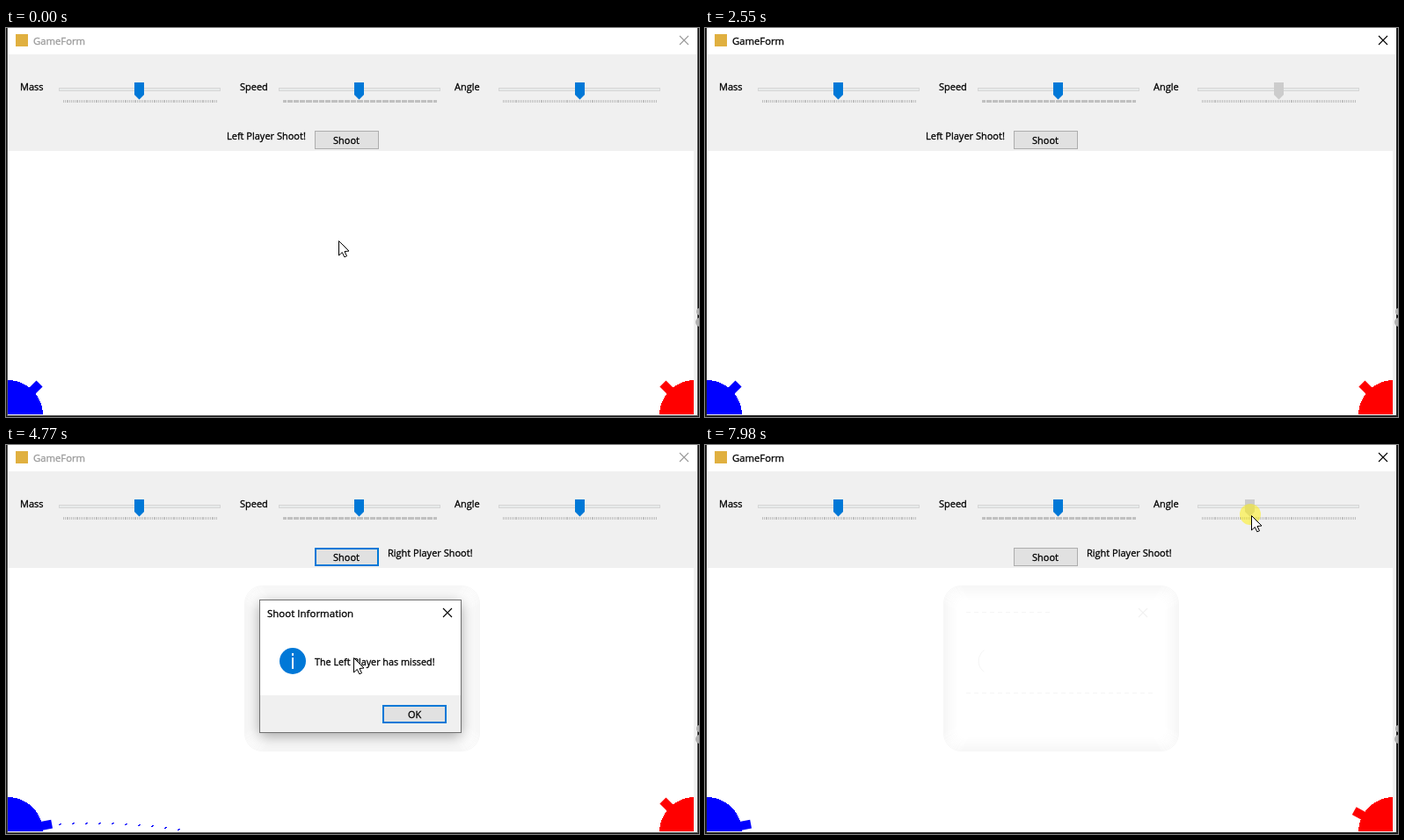
Recreate the animation shown at these times as an HTML page with a canvas. Size 788 by 443 pixels, loop 8000 ms.

```html
<!DOCTYPE html>
<html lang="en">
<head>
<meta charset="utf-8">
<title>GameForm</title>
<style>
html, body { margin: 0; width: 100%; height: 100%; overflow: hidden; background: #fff; }
canvas { display: block; width: 788px; height: 443px; }
</style>
</head>
<body>
<canvas id="stage" width="788" height="443"></canvas>
<script>
const ctx = document.getElementById('stage').getContext('2d');
const LOOP = 8000, BLUE = '#0078d7', CENTER = 652.5;

// Points the pointer travels between
const HOME = [378, 242], LABEL = [232, 140], LEFT_GUN = [78, 372], ANGLE = [654, 76],
  LOW_ANGLE = [585, 80], SHOOT = [386, 132], MESSAGE = [380, 243], OK = [468, 306],
  BELOW_SLIDERS = [417, 108], RIGHT_AIM = [619, 80];

// Each move takes equal time per leg; the pointer vanishes while it rests in between
const MOVES = [
  { from: 40, to: 640, via: [[290, 133], LABEL] },
  { from: 860, to: 1660, via: [[204, 296], LEFT_GUN, [504, 49], [418, 88]] },
  { from: 1680, to: 2050, via: [[661, 76], ANGLE] },
  { from: 2600, to: 3400, via: [LOW_ANGLE] },
  { from: 3400, to: 3780, via: [SHOOT] },
  { from: 4400, to: 4950, via: [[403, 242], MESSAGE] },
  { from: 5150, to: 5700, via: [OK] },
  { from: 5960, to: 6370, via: [[430, 90], BELOW_SLIDERS] },
  { from: 6560, to: 7330, via: [ANGLE] },
  { from: 7580, to: LOOP, via: [RIGHT_AIM] }
];
const DRAG_LEFT = [2250, 3400], FIRE = [4050, 4110], CONFIRM = [5790, 5850], DRAG_RIGHT = [7580, LOOP];

const during = (t, [a, b]) => t >= a && t < b;
const ramp = (t, a, b) => Math.min(1, Math.max(0, (t - a) / (b - a)));
const inBox = (p, x, y, w, h) => p.x >= x && p.x < x + w && p.y >= y && p.y < y + h;

function pointerAt(t) {
  let last = HOME, visible = t < MOVES[0].from;
  for (const { from, to, via } of MOVES) {
    if (t < from) break;
    if (t < to) {
      const stops = [last, ...via], pos = ramp(t, from, to) * via.length, i = Math.floor(pos);
      last = stops[i].map((v, axis) => v + (stops[i + 1][axis] - v) * (pos - i));
      visible = true;
      break;
    }
    last = via[via.length - 1];
  }
  return { x: Math.round(last[0]), y: Math.round(last[1]), visible };
}

function rect(x, y, w, h, fill) {
  ctx.fillStyle = fill;
  ctx.fillRect(x, y, w, h);
}

function frame(x, y, w, h, color, width = 1) {
  ctx.strokeStyle = color;
  ctx.lineWidth = width;
  ctx.strokeRect(x + width / 2, y + width / 2, w - width, h - width);
}

// A hairline outline gives the crisp, dark look of hinted screen text
function text(str, x, y, color = '#000', size = 11) {
  ctx.font = `${size}px "Open Sans", "Noto Sans", sans-serif`;
  ctx.fillStyle = ctx.strokeStyle = color;
  ctx.lineWidth = 0.3;
  ctx.fillText(str, x, y);
  ctx.strokeText(str, x, y);
}

function poly(points, fill, stroke) {
  ctx.beginPath();
  points.forEach(([x, y]) => ctx.lineTo(x, y));
  ctx.closePath();
  ctx.fillStyle = fill;
  ctx.fill();
  if (stroke) {
    ctx.strokeStyle = stroke;
    ctx.lineWidth = 1;
    ctx.stroke();
  }
}

function cross(x, y, color, r = 5) {
  ctx.strokeStyle = color;
  ctx.lineWidth = 1.1;
  ctx.beginPath();
  ctx.moveTo(x - r, y - r); ctx.lineTo(x + r, y + r);
  ctx.moveTo(x + r, y - r); ctx.lineTo(x - r, y + r);
  ctx.stroke();
}

function disc(x, y, r, fill) {
  ctx.fillStyle = fill;
  ctx.beginPath();
  ctx.arc(x, y, r, 0, 7);
  ctx.fill();
}

function button(label, x, y, w, h, labelX, state) {
  const [fill, edge, width] = {
    plain: ['#e1e1e1', '#adadad', 1], focus: ['#e1e1e1', BLUE, 2],
    hover: ['#e5f1fb', BLUE, 1], down: ['#cce4f7', '#005499', 1]
  }[state];
  rect(x, y, w, h, fill);
  frame(x, y, w, h, edge, width);
  text(label, labelX, y + 15);
}

function slider(x, ticks, thumb, state) {
  rect(x, 68, 184, 4, '#e7eaea');
  frame(x, 68, 184, 4, '#d6d6d6');
  for (let i = 0; i <= ticks; i++) rect(x + 5 + Math.round(i * 174 / ticks), 82, 1, 3, '#c0c0c0');
  const color = { plain: BLUE, hover: '#171717', down: '#cccccc' }[state];
  const left = thumb - 5.5, right = thumb + 5.5;
  poly([[left, 62], [right, 62], [right, 76], [thumb, 81.5], [left, 76]], color);
}

// Quarter disc in whole pixel rows, with a barrel turned to the aim
function cannon(x, side, degrees, color) {
  for (let row = 0; row < 40; row++) {
    const half = Math.round(Math.sqrt(40 ** 2 - (row + 0.5) ** 2));
    rect(x - half, 440 - row, 2 * half, 1, color);
  }
  ctx.save();
  ctx.translate(x, 441);
  ctx.scale(side, 1);
  ctx.rotate(-degrees * Math.PI / 180);
  rect(0, -5, 51, 10, color);
  ctx.restore();
}

function trail() {
  for (let i = 0; i < 10; i++) {
    const x = 60 + 15 * i, y = Math.round(431 + 0.17 * (i - 2.5) ** 2);
    rect(x, y, 2, 1, '#00f');
    rect(x + 1, y - 1, 2, 1, '#00f');
  }
}

// Faint traces that stay on the canvas around and inside the message
function residue() {
  for (let i = 0; i < 16; i++) {
    ctx.strokeStyle = `rgba(0,0,0,${0.034 * (1 - i / 16)})`;
    ctx.lineWidth = 1;
    ctx.beginPath();
    ctx.roundRect(271.5 + i, 160.5 + i, 267 - 2 * i, 188 - 2 * i, 20 - i / 2);
    ctx.stroke();
  }
  ctx.strokeStyle = '#f5f5f5';
  ctx.beginPath();
  ctx.arc(326, 246, 15, 2.2, 4.1);
  ctx.stroke();
  ctx.setLineDash([5, 4]);
  ctx.beginPath();
  ctx.moveTo(297, 190.5); ctx.lineTo(392, 190.5);
  ctx.moveTo(297, 282.5); ctx.lineTo(512, 282.5);
  ctx.stroke();
  ctx.setLineDash([]);
  cross(498, 191, '#f1f1f1');
}

function dialog(shown, okState) {
  ctx.globalAlpha = shown;
  ctx.shadowColor = 'rgba(0,0,0,.36)';
  ctx.shadowBlur = 15;
  ctx.shadowOffsetY = 4;
  rect(288, 176, 230, 152, '#fff');
  ctx.shadowColor = 'transparent';
  // Opaque base keeps the shadow out of the fading window
  ctx.globalAlpha = 1;
  rect(288, 176, 230, 152, '#fff');
  ctx.globalAlpha = shown;
  rect(289, 285, 228, 42, '#f0f0f0');
  frame(288, 176, 230, 152, '#707070');
  text('Shoot Information', 297, 196, '#000', 11.5);
  cross(502, 191, '#000');
  disc(326, 246, 15, BLUE);
  rect(325, 242, 2, 13, '#fff');
  rect(325, 237, 2, 3, '#fff');
  text('The Left Player has missed!', 351, 251, '#000', 10.8);
  button('OK', 428, 296, 73, 21, 457, okState);
}

function pointer({ x, y }, dragging) {
  if (dragging) disc(x - 1, y - 1, 12, 'rgba(255,240,0,.5)');
  const shape = [[0, 0], [0, 16.5], [3.8, 13], [6.3, 18.3], [9, 17.2], [6.5, 12], [11.5, 11.5]];
  poly(shape.map(([a, b]) => [x + 0.5 + a, y + 0.5 + b]), '#fff', '#000');
}

function draw(t) {
  const mouse = pointerAt(t);
  const shown = ramp(t, 4150, 4245) - ramp(t, 5850, 5980);
  const modal = during(t, [4150, 5850]);
  const active = t >= DRAG_LEFT[0] && !modal;
  const dragging = during(t, DRAG_LEFT) || during(t, DRAG_RIGHT);
  const fired = t >= FIRE[1];

  let angleThumb = CENTER;
  if (dragging) angleThumb = mouse.x - 1.5;
  else if (during(t, [DRAG_LEFT[1], FIRE[1]])) angleThumb = LOW_ANGLE[0] - 1.5;
  const aim = 45 + (angleThumb - CENTER) / 2;

  rect(0, 0, 788, 443, '#1a1a1a');
  rect(1, 0, 786, 442, active ? '#222' : '#555');
  rect(2, 0, 784, 30, '#fff');
  rect(2, 30, 784, 411, '#f0f0f0');
  rect(2, 140, 780, 300, '#fff');
  disc(789, 323, 4, '#b0b0b0');
  disc(789, 335, 5, '#b0b0b0');

  rect(11, 7, 14, 14, '#e0b040');
  const titleColor = active ? '#000' : '#999';
  text('GameForm', 31, 19, titleColor, 11.3);
  cross(771, 14, titleColor);

  text('Mass', 16, 71);
  text('Speed', 266, 71);
  text('Angle', 510, 71);
  const thumbState = x => !modal && inBox(mouse, x - 5.5, 62, 11, 19) ? 'hover' : 'plain';
  slider(60, 95, 151.5, thumbState(151.5));
  slider(310, 150, 401.5, thumbState(401.5));
  slider(560, 90, angleThumb, dragging ? 'down' : thumbState(angleThumb));

  if (fired) text('Right Player Shoot!', 434, 127);
  else text('Left Player Shoot!', 251, 127);
  let shootState = during(t, [FIRE[0], DRAG_RIGHT[0]]) ? 'focus' : 'plain';
  if (!modal && inBox(mouse, 351, 117, 73, 21)) shootState = during(t, FIRE) ? 'down' : 'hover';
  button('Shoot', 351, 117, 73, 21, 372, shootState);

  ctx.save();
  ctx.beginPath();
  ctx.rect(2, 140, 780, 300);
  ctx.clip();
  cannon(2, 1, fired ? 10.5 : aim, '#00f');
  cannon(783, -1, fired ? aim : 45, '#f00');
  if (during(t, [FIRE[1], DRAG_RIGHT[0]])) trail();
  ctx.restore();

  // The window grows slightly while it appears and shrinks as it closes
  const scale = 0.95 + 0.05 * shown;
  const grow = s => {
    ctx.translate(403, 252);
    ctx.scale(s, s);
    ctx.translate(-403, -252);
  };
  ctx.save();
  grow(t < CONFIRM[0] ? scale : 1);
  if (t >= 4180) residue();
  ctx.restore();
  if (shown > 0) {
    const overOk = inBox(mouse, 428, 296, 73, 21);
    ctx.save();
    grow(scale);
    dialog(shown, during(t, CONFIRM) ? 'down' : overOk ? 'hover' : 'focus');
    ctx.restore();
  }
  if (mouse.visible) pointer(mouse, dragging);
}

const start = performance.now();
function tick() {
  draw((performance.now() - start) % LOOP);
  requestAnimationFrame(tick);
}
tick();
</script>
</body>
</html>
```
